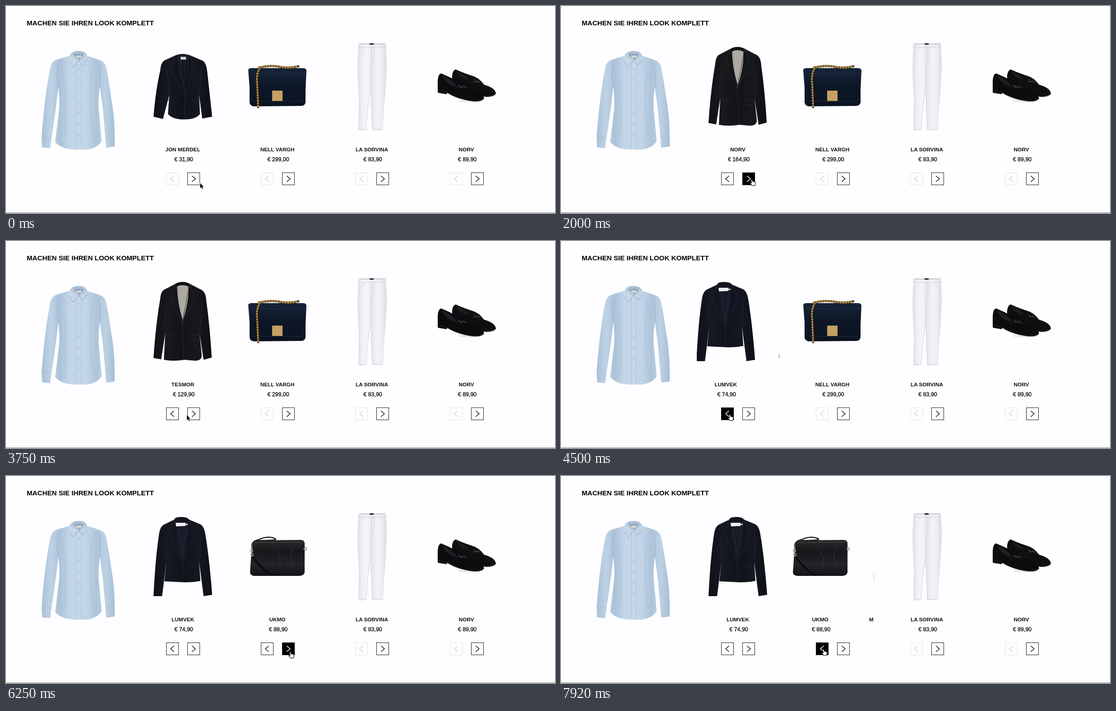
An HTML page that plays this animation: 1217 px wide and 460 px high, repeating every 8 s.

```html
<!DOCTYPE html>
<html lang="de">
<head>
<meta charset="utf-8">
<title>Look</title>
<style>
html, body { margin: 0; width: 100%; height: 100%; overflow: hidden; background: #fefdff; }
svg { display: block; }
text { font-family: "Liberation Sans", Arial, sans-serif; fill: #111; }
.name { font-size: 11.8px; font-weight: bold; text-anchor: middle; }
.price { font-size: 12.4px; text-anchor: middle; stroke: #111; stroke-width: .35px; }
.btn rect { fill: #fefdff; stroke: #1a1a1a; }
.btn path { fill: none; stroke: #1a1a1a; stroke-width: 1.6; }
.btn.off rect { stroke: #e3e2e6; }
.btn.off path { stroke: #d2d1d6; }
.btn.hot rect { fill: #000; stroke: #000; }
.btn.hot path { stroke: #fff; }
.line { fill: none; stroke-linecap: round; stroke-linejoin: round; }
</style>
</head>
<body>
<svg id="stage" width="1217" height="460" viewBox="0 0 1217 460"></svg>
<script>
const STEP = 209.5, WIDTH = 183, SLIDE = 300, LOOP = 8000;

const line = (d, color, w = 1, extra = '') =>
  `<path class="line" d="${d}" stroke="${color}" stroke-width="${w}" ${extra}/>`;
const fill = (d, color) => `<path d="${d}" fill="${color}"/>`;
const grad = (id, stops, dir = '') => `<linearGradient id="${id}" ${dir}>` +
  stops.map((c, i) => `<stop offset="${i / (stops.length - 1)}" stop-color="${c}"/>`).join('') +
  '</linearGradient>';

const defs = grad('blue', ['#a9c0d7', '#bfd3e5', '#abc2d9', '#c2d5e7', '#c5d8e9', '#c1d4e6', '#aec4da', '#bdd1e4', '#a7bed5']) +
  grad('navy', ['#0f1118', '#161822', '#11131b', '#151721', '#0e1017']) +
  grad('coal', ['#101115', '#17191d', '#131418', '#16181c', '#0e0f13']) +
  grad('white', ['#dcdce2', '#f1f1f5', '#f6f6f9', '#e6e6ec', '#f3f3f7', '#efeff3', '#d8d8df']) +
  grad('bag', ['#17243a', '#0d1727', '#0b1422'], 'x2="0" y2="1"') +
  grad('hide', ['#282a2d', '#151719', '#222427', '#111315'], 'x2="0" y2="1"') +
  grad('dark', ['#171c26', '#0d121b', '#090d14'], 'x2="0" y2="1"');

const shirt =
  fill('M113 119Q101 123 98 137Q85 205 79 291L80 314L98 316L101 292Q110 235 116 180Q121 215 116 245L109 302Q121 317 149 319L181 319Q205 314 212 300L207 245Q203 215 208 180L215 230L220 290L222 315L241 312Q242 250 233 203Q227 160 222 136Q219 123 205 119L178 110L143 110Z', 'url(#blue)') +
  fill('M142 108Q149 99 161 100Q173 99 179 108L175 117L145 117Z', '#a9bfd5') +
  fill('M149 108Q161 104 173 108L164 120Z', '#8fa5bd') +
  fill('M156 110h11v5h-11z', '#d9d5cc') +
  fill('M142 108L145 105L161 121L149 136L140 123Z', '#c6d8e8') +
  fill('M179 108L176 105L161 121L170 132L181 119Z', '#c0d3e5') +
  line('M142 108L161 121L179 108M140 123L149 136L161 121L170 132L181 119', '#8fa6be') +
  line('M156 124L156 318M167 128L167 318', '#a3bad1', .9) +
  line('M116 128Q111 155 116 180M206 128Q210 155 208 180', '#97aec6', 1.2) +
  line('M80 290L101 293M220 290L241 288M128 160Q136 220 131 295M190 145Q181 220 194 295', '#a7bed5') +
  [140, 164, 188, 213, 237, 262, 287].map(y => `<circle cx="161" cy="${y}" r="1.6" fill="#d6e2ee" stroke="#8ea6bf" stroke-width=".7"/>`).join('');

const jacketA =
  fill('M375 110Q391 103 409 110L437 122Q444 128 446 145L457 246L435 250L428 197L430 240Q421 252 397 252Q370 253 359 240L362 198L348 251L327 246Q332 185 342 143Q343 126 351 121Z', 'url(#navy)') +
  fill('M379 110Q392 105 406 110L397 193Q386 165 379 110Z', '#1b1d2a') +
  fill('M387 113h12v6h-12z', '#d9d4cd') +
  line('M391 121L393 160M400 124L397 180', '#0c0d15', 2) +
  line('M375 110L365 142L372 145L368 151L396 194M409 110L417 141L410 145L414 151L397 194L395 250', '#2a2d39', .9) +
  line('M355 209L377 205M408 208L426 212M362 198Q360 160 357 143M428 197Q433 160 432 143', '#262935', 1.1);

const jacketB =
  fill('M376 95Q391 87 407 95L434 109Q443 114 444 133Q452 190 456 259L438 264L429 205L434 254Q434 266 419 266L396 264Q370 268 350 264L353 205L344 263L327 260Q332 185 342 128Q343 112 351 108Z', 'url(#coal)') +
  fill('M379 98Q392 92 404 98Q407 130 392 177Q380 140 379 98Z', '#aaa59f') +
  line('M386 100L388 154M392 99V167M398 100L396 153', '#bdb9b3') +
  fill('M376 95Q391 87 407 95L404 101Q391 95 379 101Z', '#101116') +
  line('M376 95L364 125L372 130L367 136L391 180L407 95M407 95L418 126L410 130L414 136L391 180L394 263', '#2d2f35', .9) +
  line('M356 208L379 206M407 208L429 210L428 221L407 218M353 205Q352 155 356 137M429 205Q436 150 432 134M410 148L421 145', '#282a30') +
  '<circle cx="391" cy="182" r="1.8" fill="#3b3d43"/>';

const jacketC =
  fill('M373 97Q374 91 389 91Q402 91 406 97L430 107Q439 111 442 130Q451 185 457 264L438 267L428 190L431 233Q412 237 391 236L351 234L356 188L346 267L327 267Q331 184 339 131Q341 113 350 108Z', 'url(#navy)') +
  fill('M376 103Q390 98 404 103Q405 150 391 191Q377 150 376 103Z', '#181a27') +
  line('M382 120Q388 150 391 180M399 118Q395 150 392 168', '#212437', 2) +
  fill('M376 104L398 104L398 111L377 112Z', '#f1f0ee') + fill('M398 106h5v3h-5z', '#c4c3c4') +
  line('M373 97L363 127L391 192M406 97L419 128L391 192L392 235', '#292b36', .9) +
  line('M359 203L375 206M410 203L427 202M356 188Q352 152 355 136M428 190Q432 150 430 132', '#252732', 1.1);

const ring = (x, y, c = '#b9b9bb') => `<circle cx="${x}" cy="${y}" r="3" fill="none" stroke="${c}" stroke-width="1.4"/>`;

const chain = d => line(d, '#3a2c15', 4.6) + line(d, '#c39a4b', 4, 'stroke-dasharray=".6 5.4"') +
  line(d, '#a57c34', 1.5, 'stroke-dasharray="3 3"');

const bagA =
  fill('M540 150L664 150L664 214Q663 221 655 222L549 223Q541 222 540 214Z', '#0b1321') +
  fill('M537 142Q538 138 545 138L658 138Q665 138 666 143L663 207Q662 214 654 214L551 214Q543 214 542 207Z', 'url(#bag)') +
  line('M540 149Q600 154 664 149M543 206Q544 212 552 212L653 212Q660 212 661 206', '#263550', .8) +
  chain('M560 137Q590 130 612 136Q630 139 648 134') + chain('M562 139Q554 152 557 176L559 225') +
  '<rect x="590" y="188" width="23" height="23" fill="#c5a062"/>';

const bagB =
  line('M545 156Q545 145 558 142Q572 136 582 136Q597 137 598 141Q584 144 560 143', '#1b1d1f', 2.4) +
  fill('M548 146Q549 143 556 143L654 142Q661 142 662 149L662 214Q661 221 650 222L550 222Q541 221 541 213L544 170Z', 'url(#hide)') +
  line('M550 148L660 147', '#4a4c4e') +
  line('M547 178Q566 206 590 219', '#0a0b0d', 5) + line('M549 178Q569 205 590 217', '#3a3c3f', .8) +
  line('M600 165Q612 180 606 205M636 160Q628 180 638 204', '#292c2f', 2) +
  line('M544 158L544 178', '#8f9092', 2) + ring(544, 166) + ring(545, 175) + ring(663, 162, '#77787a');

const bagC =
  line('M546 160Q552 116 580 101Q596 92 614 101Q639 116 649 157', '#11141a', 2.5) +
  ring(546, 163) + ring(546, 170) + ring(650, 160) + ring(652, 167) +
  fill('M549 172Q596 174 650 170Q657 172 658 190L662 238Q662 257 645 260Q600 264 556 258Q540 255 538 238Q536 210 541 188Q543 175 549 172Z', '#0a0e15') +
  fill('M546 178Q550 172 558 172Q600 174 645 170Q655 171 656 184L661 224Q660 241 645 243Q598 247 552 239Q541 232 542 204Z', 'url(#dark)') +
  line('M547 236Q598 246 647 241Q658 238 659 226', '#333a46', .8) +
  line('M540 190Q536 225 578 260M544 195Q545 230 582 259', '#06090e', 4) +
  '<text x="601.5" y="235" text-anchor="middle" style="font-size:4.8px;fill:#a9adb2">MARTHIN VORN</text>' +
  line('M654 168L658 224', '#20242b') + '<circle cx="658" cy="233" r="7" fill="#aeafb1"/>';

const pants =
  fill('M781 83L842 82L844 130Q842 190 838 226L836 275Q824 279 812 275L810 225L809 180L802 225L797 276Q788 278 781 276L782 205Q778 145 780 112Z', 'url(#white)') +
  fill('M784 83L839 83L839 86L784 86Z', '#d2d2d8') + fill('M806 83h9v3h-9z', '#25252a') +
  line('M781 92L843 91M810 92Q811 120 809 148V180L802 225L798 275M812 275L810 225L809 180', '#cacad1', .9) +
  line('M781 105Q792 103 795 92M843 104Q832 102 829 92M817 92Q819 118 810 127', '#d2d2d9', .9) +
  line('M785 275L797 274M813 274L835 274', '#c8c8d0', .9);

const shoes =
  '<ellipse cx="1030" cy="211" rx="28" ry="3" fill="#e6e5e8"/>' +
  '<ellipse cx="1071" cy="200" rx="13" ry="3" fill="#e6e5e8"/>' +
  fill('M989 162Q988 144 997 141Q1014 149 1033 155Q1047 158 1060 175Q1085 182 1086 195Q1081 202 1064 202Q1028 196 990 172Z', '#0f0f12') +
  fill('M957 191L957 167Q958 150 965 150Q982 157 997 165Q1015 165 1029 182Q1056 190 1060 205Q1056 213 1037 212Q1001 208 978 193L977 196L958 193Z', '#0c0c0f') +
  fill('M965 153Q991 165 1000 179Q978 178 965 153Z', '#1e1e22') + fill('M998 144Q1018 152 1027 164Q1007 163 998 144Z', '#1d1d21') +
  line('M958 187L978 192Q1003 208 1037 211L1058 207M1064 201L1084 197', '#2a2a2e', .9) +
  line('M996 184Q1010 171 1027 183M1033 172Q1045 161 1058 176', '#232327', 1.2) +
  line('M1004 175q4 9 8 5t7 3M1037 163q2 8 7 5t5 2', '#59595f', 1.2);

const rows = [
  [[jacketA, 'JON MERDEL', '31,90'], [jacketB, 'NORV', '164,90'], [jacketC, 'LUMVEK', '74,90'], [jacketB, 'TESMOR', '129,90']],
  [[bagA, 'NELL VARGH', '299,00'], [bagB, 'UKMO', '88,90'], [bagC, 'MARTHIN MARTHIN VORN', '195,90']],
  [[pants, 'LA SORVINA', '83,90']],
  [[shoes, 'NORV', '89,90']]
];

const buttonX = (k, side) => Math.round((side ? 402 : 355) + STEP * k);

const button = (k, side) => `<g class="btn" transform="translate(${buttonX(k, side)} 370)">
  <rect x=".5" y=".5" width="27" height="27"/>
  <path d="${side ? 'M10.3 7.5L17.8 14L10.3 20.5' : 'M17.5 7.5L10 14L17.5 20.5'}"/></g>`;

const carousel = (items, k) => {
  const mid = 392 + STEP * k;
  const slides = items.map(([art, name, price], i) => `<g transform="translate(${i * WIDTH})">${art}
    <text class="name" x="${mid}" y="323">${name}</text>
    <text class="price" x="${mid + 2}" y="345">€ ${price}</text></g>`).join('');
  return `<clipPath id="win${k}"><rect x="${301 + STEP * k}" y="60" width="${WIDTH}" height="300"/></clipPath>
    <g clip-path="url(#win${k})"><g class="track">${slides}</g></g>
    ${button(k, 0)}${button(k, 1)}`;
};

const stage = document.getElementById('stage');
stage.innerHTML = `<defs>${defs}</defs><rect width="1217" height="460" fill="#fefdff"/>
  <text x="46" y="43" style="font-size:15.15px;font-weight:bold;fill:#000">MACHEN SIE IHREN LOOK KOMPLETT</text>
  ${shirt}${rows.map(carousel).join('')}
  <rect y="459" width="1217" height="1" fill="#858488"/>
  <circle id="ring" r="24.3" fill="none" stroke="#000" stroke-width="2.4"/>
  <g id="cursor">
    <path id="arrow" d="M0 0V13L3 10.2L5.2 15L7.4 14L5.2 9.3H9.3Z" fill="#000" stroke="#fff" stroke-width=".9"/>
    <path id="hand" d="M-2.3 .4Q-.8-1.3 .5 .4L1.5 4.2Q3 3.2 3.7 4.4Q5.3 3.7 5.8 5.2Q7.5 4.7 7.5 6.7L7 10.2L6.3 13.2H.1L-4.1 8.2Q-4.5 6.4-2.5 6.6L-1.1 7.5Z" fill="#fff" stroke="#000" stroke-width="1.1"/>
  </g>`;

const tracks = stage.querySelectorAll('.track'), buttons = stage.querySelectorAll('.btn');
const [halo, cursor, arrow, hand] = ['ring', 'cursor', 'arrow', 'hand'].map(id => document.getElementById(id));

// carousel, direction, slide start, whether the press shows a ring
const clicks = [
  [0, 1, 1080, 1], [0, 1, 2170, 1], [0, 1, 3340, 1], [0, -1, 4334, 0],
  [1, 1, 5760, 1], [1, 1, 6590, 1], [1, -1, 7754, 1]
];
const path = [
  [0, 430, 393], [100, 430, 393], [600, 423.5, 386], [3520, 423.5, 386], [4000, 374.5, 386],
  [4840, 374.5, 386], [5500, 631, 391.5], [7150, 631, 391.5], [7500, 582.5, 385.5], [LOOP, 582.5, 385.5]
];

// cubic-bezier(.25, .1, .25, 1)
function ease(x) {
  if (x <= 0 || x >= 1) return x <= 0 ? 0 : 1;
  let lo = 0, hi = 1, s;
  for (let i = 0; i < 20; i++) {
    s = (lo + hi) / 2;
    if (.75 * s * (1 - s) + s ** 3 < x) lo = s; else hi = s;
  }
  return .3 * s * (1 - s) ** 2 + 3 * (1 - s) * s * s + s ** 3;
}

function cursorAt(t) {
  const i = path.findIndex(p => p[0] > t), [t0, x0, y0] = path[i - 1], [t1, x1, y1] = path[i];
  const u = (t - t0) / (t1 - t0), e = u * u * (3 - 2 * u);
  return [x0 + (x1 - x0) * e, y0 + (y1 - y0) * e];
}

function draw(t) {
  const [x, y] = cursorAt(t);
  let over = false;
  rows.forEach((_, k) => {
    let pos = 0, target = 0;
    for (const [c, dir, at] of clicks) {
      if (c !== k || t < at) continue;
      pos += dir * ease((t - at) / SLIDE);
      target += dir;
    }
    tracks[k].setAttribute('transform', `translate(${-pos * WIDTH})`);
    for (const side of [0, 1]) {
      const bx = buttonX(k, side), off = !side && target === 0;
      const hot = !off && x >= bx && x < bx + 28 && y >= 370 && y < 398;
      over = over || hot;
      buttons[k * 2 + side].setAttribute('class', 'btn' + (off ? ' off' : hot ? ' hot' : ''));
    }
  });
  const pressed = clicks.some(([, , at, shown]) => shown && t >= at - 90 && t < at + 60);
  const place = `translate(${x} ${y})`;
  cursor.setAttribute('transform', place);
  halo.setAttribute('transform', place);
  halo.style.display = pressed ? '' : 'none';
  arrow.style.display = over ? 'none' : '';
  hand.style.display = over ? '' : 'none';
}

const start = performance.now();
function frame() {
  draw((performance.now() - start) % LOOP);
  requestAnimationFrame(frame);
}
frame();
</script>
</body>
</html>
```
